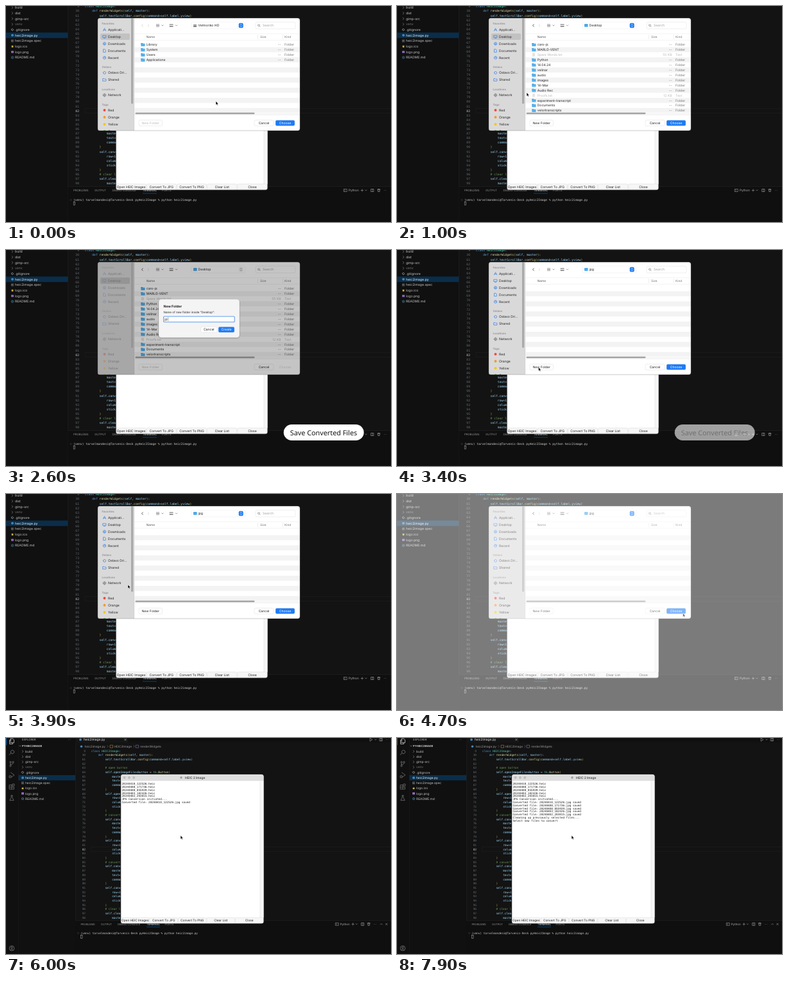
Recreate the animation shown at these times as an HTML page. Size 600 by 338 pixels, loop 8000 ms.

```html
<!DOCTYPE html>
<html lang="en">
<head>
<meta charset="utf-8">
<title>Saving converted files</title>
<style>
  html, body { margin: 0; width: 100%; height: 100%; overflow: hidden; background: #111; }
  svg { display: block; width: 100vw; height: 100vh; text-rendering: geometricPrecision; }
  text { font-family: Inter, "Liberation Sans", sans-serif; white-space: pre; }
  .mono { font-family: "DejaVu Sans Mono", monospace; }
  .note { font-family: "Noto Sans", "Open Sans", sans-serif; }
</style>
</head>
<body>
<svg id="stage" viewBox="0 0 600 338"></svg>
<script>
const LOOP = 8000, STEP = 100;
const BLUE = '#1d7bf5', ICON = '#2f80e4';

// y is the vertical middle of the line
const text = (x, y, str, size, fill, more = '') =>
  `<text x="${x}" y="${y + size * .36}" font-size="${size}" fill="${fill}" ${more}>${str}</text>`;
const mono = (x, y, str, size, fill, more = '') => text(x, y, str, size, fill, 'class="mono" ' + more);
const rect = (x, y, w, h, fill, r = 0, more = '') =>
  `<rect x="${x}" y="${y}" width="${w}" height="${h}" rx="${r}" fill="${fill}" ${more}/>`;
const dot = (x, y, r, fill, more = '') => `<circle cx="${x}" cy="${y}" r="${r}" fill="${fill}" ${more}/>`;
const line = (x, y, d, stroke, w = .6) =>
  `<path transform="translate(${x} ${y})" d="${d}" fill="none" stroke="${stroke}" stroke-width="${w}" stroke-linecap="round" stroke-linejoin="round"/>`;
const group = (id, body) => `<g id="${id}">${body}</g>`;
const MID = 'text-anchor="middle"', END = 'text-anchor="end"', BOLD = 'font-weight="600"';
const RIGHT = 'M-.9-1.7L.9 0L-.9 1.7', LEFT = 'M.9-1.7L-.9 0L.9 1.7', DOWN = 'M-1.2-.6L0 .6L1.2-.6';
const BOX = 'M-2-2H2V2H-2Z';

/* ---------- editor ---------- */
function paint(code) {
  const tones = ['#6a9955', '#569cd6', '#4ec9b0', '#dcdcaa', '#d7ba4a', '#9cdcfe'];
  return code.replace(/(#.*)|\b(class|def)\b|\b(HEIC2Image|tk)\b|\b(renderWidgets|config|Button|grid)\b|([()])|(\w+)/g,
    (m, ...g) => `<tspan fill="${tones[g.findIndex((v, i) => i < 6 && v)]}">${m}</tspan>`);
}

function codeLine(n) {
  if (n === 61) return [8, 'self.textScrollBar.config(command=self.label.yview)'];
  if (n < 63) return [0, ''];
  const k = n - 63;
  const [note, name] = [['open button', 'openImageFilesButton'], ['convert to jpg', 'convertToJPGButton'],
    ['convert to png', 'convertToPNGButton'], ['clear list', 'clearListButton']][Math.floor(k / 11)];
  return [[8, '# ' + note], [8, `self.${name} = tk.Button(`], [12, 'master,'], [12, 'text=label,'],
    [12, 'command=action'], [8, ')'], [8, `self.${name}.grid(`], [12, 'row=1,'], [12, 'column=0,'],
    [12, 'sticky=W'], [8, ')']][k % 11];
}

function tree(o) {
  const names = ['build', 'dist', 'gimp-src', 'venv', '.gitignore', 'heic2image.py', 'heic2image.spec',
    'logo.ico', 'logo.png', 'README.md'];
  const icon = [
    (x, y) => line(x, y, 'M0-1.7L1.7 0L0 1.7L-1.7 0Z', '#8a8f94', 1),
    (x, y) => dot(x, y, 2, '#4385b8'),
    (x, y) => line(x, y, 'M-1.7-1.4H1.7M-1.7 0H1.2M-1.7 1.4H1.7', '#a8a8a8', .6),
    (x, y) => `<path transform="translate(${x} ${y})" d="M0-2.2L.6-.7L2.2-.6L1 .5L1.4 2.1L0 1.2L-1.4 2.1L-1 .5L-2.2-.6L-.6-.7Z" fill="#d8c04a"/>`,
    (x, y) => rect(x - 2, y - 1.7, 4, 3.4, '#9068b8', .5),
    (x, y) => dot(x, y, 1.7, 'none', 'stroke="#519aba" stroke-width=".6"') + rect(x - .3, y - .8, .6, 1.7, '#519aba')
  ];
  return names.map((name, i) => {
    const y = o.treeY + i * 22 * o.s, x = o.treeX;
    return (i === 5 ? rect(o.left, y - 11 * o.s, o.edge - o.left, 22 * o.s, '#0a2e4a') : '') +
      (i < 4 ? line(x - 4, y, RIGHT, '#aaa', .5) : icon[i - 4](x - 4, y)) +
      text(x, y, name, 13 * o.s, i === 3 ? '#747474' : i === 5 ? '#f2f2f2' : '#c6c6c6');
  }).join('');
}

function panel(o) {
  const k = o.s / .394, y = o.tabY, c = '#b5b5b5', size = 11 * o.s;
  const tabs = ['PROBLEMS', 'OUTPUT', 'DEBUG CONSOLE', 'TERMINAL', 'PORTS'], at = [0, 33, 60.5, 108, 138];
  const p = dx => o.toolX + dx * k;
  return rect(o.edge, o.panelY, 600 - o.edge, 338, '#0f0f0f') + rect(o.edge, o.panelY, 600 - o.edge, .5, '#262626') +
    tabs.map((t, i) => text(o.panelX + at[i] * k, y, t, size, i === 3 ? '#e4e4e4' : '#8f8f8f')).join('') +
    rect(o.panelX + 108 * k, y + 4.3, 22 * k, .5, '#0078d4') +
    line(p(0), y, 'M-2.3-2H2.3V2H-2.3ZM-1.2-.8L-.2 0L-1.2 .8', c, .5) + text(p(5), y, 'Python', 12 * o.s, c) +
    line(p(26), y, 'M-1.8 0H1.8M0-1.8V1.8', c, .5) + line(p(32), y, DOWN, c, .5) +
    line(p(42), y, BOX + 'M0-2V2', c, .5) + line(p(52), y, 'M-2-1.4H2M-.7-2H.7M-1.4-1.4L-1.2 2H1.2L1.4-1.4', c, .6) +
    text(p(62), y - 1, '…', 5, c, MID) +
    dot(o.panelX - 4, o.promptY, 1.1, 'none', 'stroke="#555" stroke-width=".4"') +
    mono(o.panelX, o.promptY, '(venv) tarvelmondesi@Tarvenis-Desk pyHeic2Image % python heic2image.py', 11.62 * o.s, '#cfcfcf') +
    rect(o.panelX + .2, o.promptY + 3.2, 2.3, 4.8, 'none', 0, 'stroke="#bbb" stroke-width=".5"');
}

function editor(o) {
  const size = 11.9 * o.s, adv = size * .602, rowY = n => o.y82 + (n - 82) * o.pitch;
  const row = (y, n, indent, src) =>
    mono(o.codeX - 9, y, n, size, n === 82 ? '#d0d0d0' : '#666c72', END) +
    mono(o.codeX + indent * adv, y, paint(src), size, '#ccc');
  let out = rect(0, 0, 600, 338, '#131313') + rect(0, 0, o.edge, 338, '#101010') + rect(o.edge, 0, .5, 338, '#252525');
  out += rect(o.codeX, rowY(82) - o.pitch / 2, 600, o.pitch, 'none', 0, 'stroke="#232323" stroke-width=".5"');
  out += row(rowY(59), 9, 0, 'class HEIC2Image:') + row(rowY(60), 30, 4, 'def renderWidgets(self, master):');
  for (let n = 61; n < 99; n++) out += row(rowY(n), n, ...codeLine(n));
  return out + tree(o) + panel(o);
}

function appWindow(x, y, w, h, s) {
  const labels = ['Open HEIC Images', 'Convert To JPG', 'Convert To PNG', 'Clear List', 'Close'];
  const bw = w / 5, by = y + h - 9.3;
  return rect(x, y, w, h, '#fff', 3.5, 'stroke="#555" stroke-width=".5"') +
    `<path d="M${x} ${y + 10}v-6.5q0-3.5 3.5-3.5h${w - 7}q3.5 0 3.5 3.5v6.5z" fill="#dedede"/>` +
    [0, 1, 2].map(i => dot(x + 5.6 + i * 7.3, y + 5, 2, '#bdbdbd')).join('') +
    dot(x + 94, y + 5, 1.7, '#9a9a9a') + text(x + 100, y + 5, 'HEIC 2 Image', 13 * s, '#444', BOLD) +
    rect(x + w - 5.7, y + 10, 5.7, h - 19, '#f6f6f6') + rect(x + w - 5.7, y + 10, .4, h - 19, '#d5d5d5') +
    labels.map((t, i) => rect(x + i * bw + .5, by, bw - 1, 8.6, '#f6f6f6', 1.6, 'stroke="#cfcfcf" stroke-width=".4"') +
      text(x + (i + .5) * bw, by + 4.5, t, 12.8 * s, '#1c1c1c', MID)).join('');
}

/* ---------- folder chooser ---------- */
const button = (x, y, w, h, label, fill, ink) =>
  rect(x, y, w, h, fill, 2, 'stroke="#d4d4d4" stroke-width=".4"') + text(x + w / 2, y + h / 2, label, 5.1, ink, MID);

function places(selected, dim) {
  const head = [[27, 'Favorites'], [95.5, 'Ostavo'], [130, 'Locations'], [154, 'Tags']];
  const items = [
    [37, 'Applicati...', 'M-2 2L0-2.2L2 2M-1.5 .6H1.5'],
    [48, 'Desktop', 'M-2.4-1.8H2.4V1.3H-2.4ZM-1 2.3H1'],
    [59, 'Downloads', 'M-2.2 0A2.2 2.2 0 1 1 2.2 0A2.2 2.2 0 1 1-2.2 0M0-1.1V1M-.8 .3L0 1.1L.8 .3'],
    [70, 'Documents', 'M-1.6-2.3H.6L1.7-1V2.3H-1.6Z'],
    [81, 'Recent', 'M-2.2 0A2.2 2.2 0 1 1 2.2 0A2.2 2.2 0 1 1-2.2 0M0-1.3V0H1'],
    [104.5, 'Ostavo Dri...', 'M-2 0A2 2 0 1 1 2 0A2 2 0 1 1-2 0'],
    [115.5, 'Shared', 'M-2.4-1.8H-.5L0-1.2H2.4V1.9H-2.4Z'],
    [139.5, 'Network', 'M-2.2 0A2.2 2.2 0 1 1 2.2 0A2.2 2.2 0 1 1-2.2 0M-2.2 0H2.2M0-2.2V2.2']
  ];
  const tags = [[163, 'Red', '#f0483e'], [174, 'Orange', '#f59a23'], [185, 'Yellow', '#f3c613'], [196, 'Green', '#57c038']];
  return (selected ? rect(147, 43, 46, 10, '#c3c2c3', 1.8) : '') +
    `<g opacity="${dim ? .35 : 1}">` +
    head.map(([y, t]) => text(149.5, y, t, 4.3, '#8f8d8f', BOLD)).join('') +
    items.map(([y, t, d]) => line(153.5, y, d, t === 'Network' ? '#777' : ICON, .7) + text(159, y, t, 5.1, '#262626')).join('') +
    tags.map(([y, t, c]) => dot(153.5, y, 2, c) + text(159, y, t, 5.1, '#262626')).join('') + '</g>';
}

function listing(rows) {
  return rows.map(([name, size], i) => {
    const y = 60.5 + i * 7.93, ink = size ? '#b5b5b5' : '#222', soft = size ? '#bbb' : '#777';
    const icon = size ? rect(211, y - 2.5, 4, 5, '#e4e4e4', .4) :
      rect(210.3, y - 2.4, 3, 2, '#3c9be0', .5) + rect(210.3, y - 1.8, 6.2, 4.4, '#56b0ec', .6);
    return icon + text(218.7, y, name, 5.1, ink) + text(428.5, y, size || '--', 5.1, soft, END) +
      text(434, y, size ? 'Text' : 'Folder', 5.1, soft);
  }).join('');
}

function chooser(id, place, rows, o = {}) {
  const ink = '#555', pale = '#cfcfcf';
  let out = '<g clip-path="url(#frame)">' + rect(143, 19, 315, 176, '#fff') + rect(143, 19, 57, 176, '#dad9da') +
    rect(199.7, 19, .4, 176, '#c8c8c8') + places(o.selected, o.dim) + rect(195, 19, 3.2, 134, o.dim ? '#c2c2c2' : '#a9a9a9', 1.5);
  for (let i = 1; i < 14; i += 2) out += rect(200, 56.5 + i * 7.93, 258, 7.93, '#f3f3f3');
  out += listing(rows) + rect(200, 43, 258, .4, '#e4e4e4') + rect(200, 53.4, 258, .4, '#e0e0e0') +
    [392, 431].map(x => rect(x, 45, .4, 7, '#d5d5d5')).join('') +
    text(218.7, 48.6, 'Name', 4.8, '#555') + text(396, 48.6, 'Size', 4.8, '#777') + text(434, 48.6, 'Kind', 4.8, '#777') +
    rect(200, 166, 258, 4.2, '#f7f7f7') + rect(201.5, 166.7, 186, 2.6, '#a2a2a2', 1.3) + rect(200, 170.3, 258, .4, '#dedede');
  // toolbar
  out += line(212.3, 30.5, LEFT, o.back ? '#333' : pale, .8) + line(222, 30.5, RIGHT, pale, .7) +
    line(236.5, 30.5, 'M-2.2-1.6H2.2M-2.2 0H2.2M-2.2 1.6H2.2', ink, .6) + line(244, 30.5, DOWN, ink, .6) +
    line(257.5, 30.5, 'M-2.4-1.5H-.9M-.1-1.5H1M1.8-1.5H2.6M-2.4 1.3H-.9M-.1 1.3H1M1.8 1.3H2.6', ink, 1.2) + line(265.5, 30.5, DOWN, ink, .6) +
    rect(289, 25.2, 84, 10.6, '#fff', 2, 'stroke="#e6e6e6" stroke-width=".4"') +
    (o.disk ? rect(292, 28.4, 5, 4.4, '#a9a9a9', .7) + rect(292, 31.3, 5, 1.5, '#777', .5) : rect(292, 28, 5.6, 4.8, '#4da9e8', .7)) +
    text(299.5, 30.6, place, 5.1, '#222') + rect(362.7, 26.8, 7, 7.4, o.dim ? '#f2f2f2' : BLUE, 1.7) +
    line(366.2, 30.5, 'M-1.2-.9L0-2.1L1.2-.9M-1.2 .9L0 2.1L1.2 .9', o.dim ? '#777' : '#fff', .7) +
    rect(389, 25.2, 62, 10.6, '#fff', 2, 'stroke="#dedede" stroke-width=".5"') +
    line(394, 30.2, 'M-1.5 0A1.5 1.5 0 1 1 1.5 0A1.5 1.5 0 1 1-1.5 0M1.1 1.1L2.2 2.2', '#777', .6) + text(400, 30.6, 'Search', 5.1, '#a0a0a0');
  // footer
  out += button(207, 178.5, 36.5, 9.2, 'New Folder', '#fff', o.dim || o.disk ? '#bdbdbd' : '#222') +
    button(387, 178.5, 30, 9.2, 'Cancel', '#fff', '#222') +
    (o.dim ? text(435, 183.1, 'Choose', 5.1, '#d2d2d2', MID) : button(420, 178.7, 30, 8.8, 'Choose', BLUE, '#fff'));
  if (o.dim) out += rect(143, 19, 315, 176, '#000', 0, 'opacity=".23"');
  return group(id, out + '</g>' + rect(143, 19, 315, 176, 'none', 3.5, 'stroke="#777" stroke-width=".4"'));
}

function sheet() {
  return group('sheet',
    rect(237, 77, 128, 62, '#000', 5, 'opacity=".1"') +
    rect(238, 77, 126, 60, '#f4f4f4', 4, 'stroke="#999" stroke-width=".3"') +
    text(245.5, 88.2, 'New Folder', 5.2, '#1c1c1c', 'font-weight="700"') +
    text(245.5, 97.8, 'Name of new folder inside “Desktop”:', 4.5, '#222') +
    rect(245.6, 104, 110.6, 8.8, '#fff', 1, 'stroke="#5f9df0" stroke-width="1.1"') +
    `<rect id="pick" x="247" y="105.2" width="34.5" height="6.5" fill="#b0d4fb"/>` +
    text(247.3, 108.5, '', 5.1, '#222', 'id="field"') +
    button(303.5, 120.2, 25.5, 8.8, 'Cancel', '#fff', '#222') + button(331, 120.2, 25, 8.8, 'Create', BLUE, '#fff'));
}

/* ---------- scenes ---------- */
const rootRows = ['Library', 'System', 'Users', 'Applications'].map(n => [n]);
const deskRows = [['caro-js'], ['MARLO-VENT'], ['Spare Words.txt', '55 KB'], ['Python'], ['14.04.24'], ['velinar'], ['audio'],
  ['images'], ['14-Mar'], ['Audio Rec'], ['Proofs.txt', '12 KB'], ['experiment-transcript'], ['Documents'], ['velortranscripts']];

const first = editor({ s: .394, left: 0, edge: 96.5, treeX: 14, treeY: 2.5, codeX: 123, y82: 164, pitch: 7.1,
    panelY: 282, panelX: 105, tabY: 288.5, toolX: 529, promptY: 303.5 }) +
  appWindow(171.5, 43, 236, 244.8, .394) +
  chooser('root', 'Velmoriko HD', rootRows, { disk: true, selected: true }) +
  chooser('desk', 'Desktop', deskRows, { back: true, selected: true }) +
  chooser('deskDim', 'Desktop', deskRows, { back: true, selected: true, dim: true }) +
  chooser('empty', 'jpg', [], { back: true }) + sheet() +
  group('pill', rect(432.7, 273, 125, 25, '#fff', 12.5)) +
  text(495, 285.8, 'Save Converted Files', 10.8, '#151515', 'id="note" class="note" ' + MID);

const stamps = ['20240410_122526', '20240488_171736', '20240408_055939', '20240403_182426', '20240402_203815'];
const log = [...stamps.map(s => s + '.heic'), 'JPG Conversion initiated...',
  ...stamps.map(s => `Converted file: ${s}.jpg saved`), 'Cleaning up previously selected files...', 'Select new files to convert'];

function activityBar() {
  const c = '#7d7d7d';
  return rect(0, 0, 19, 338, '#101010') + rect(19, 0, .4, 338, '#222') + rect(0, 0, .7, 11, '#0078d4') +
    line(9, 5, 'M-1.5-4H1.5L3.5-2V2.4H-1.5ZM-1.5-1.8H-3.5V4.4H1.5V2.4', '#dcdcdc', .7) +
    line(9, 22.5, 'M-1.2 .8A2.7 2.7 0 1 1 2.7 1.4A2.7 2.7 0 0 1-1.2 .8L-3.8 3.8', c, .8) +
    line(9, 40.5, 'M-2-1.2V1.8M2-1.2Q2 1-2 1.2', c, .7) +
    [[7, 37.8], [7, 43.6], [11, 37.8]].map(([x, y]) => dot(x, y, 1.2, '#101010', `stroke="${c}" stroke-width=".7"`)).join('') +
    line(9, 58, 'M-1.5-4L4 0L-.5 3M-3.5 1H-1V4H-3.5Z', c, .7) +
    line(9, 76, 'M-3.5-2.5H0V4H-3.5ZM-3.5 .8H3.5V4H0M1.2-4H4V-1.2H1.2Z', c, .7) +
    line(9, 94, 'M-1-4H1M-.8-4V-1L-3.2 3.6H3.2L.8-1V-4', c, .7) +
    dot(9, 329, 3.9, 'none', `stroke="${c}" stroke-width=".7"`) + dot(9, 328, 1.4, 'none', `stroke="${c}" stroke-width=".7"`) +
    line(9, 331, 'M-2.4 .6Q0-2 2.4 .6', c, .7);
}

const second = editor({ s: .374, left: 19, edge: 108, treeX: 30, treeY: 21, codeX: 133, y82: 174, pitch: 6.7,
    panelY: 285, panelX: 116.5, tabY: 291.3, toolX: 516, promptY: 305.3 }) +
  activityBar() +
  text(25, 2.7, 'EXPLORER', 4.2, '#b5b5b5') + text(99, 1.5, '…', 5, '#b5b5b5', MID) +
  line(22, 12.5, DOWN, '#bbb', .5) + text(25, 12.5, 'PYHEIC2IMAGE', 4.1, '#d0d0d0', 'font-weight="700"') +
  rect(108.4, 0, 492, 7, '#101010') + rect(108.4, 0, 82, 7.5, '#161616') +
  dot(116, 2.6, 1.9, '#4385b8') + text(121, 2.6, 'heic2image.py', 4.8, '#eee') + line(186, 2.6, 'M-1.3-1.3L1.3 1.3M1.3-1.3L-1.3 1.3', '#ccc', .5) +
  dot(117.5, 13.2, 1.8, '#4385b8') + text(122.5, 13.2, 'heic2image.py', 4.7, '#9a9a9a') + line(158.5, 13.2, RIGHT, '#888', .4) +
  line(164.5, 13.2, BOX, '#d99a3a', .5) + text(168.5, 13.2, 'HEIC2Image', 4.7, '#9a9a9a') + line(199.5, 13.2, RIGHT, '#888', .4) +
  line(204.5, 13.2, BOX, '#a879cf', .5) + text(209, 13.2, 'renderWidgets', 4.7, '#9a9a9a') +
  line(569, 2.6, 'M-1.5-2.3L2 0L-1.5 2.3Z', '#bbb', .5) + line(576, 2.6, DOWN, '#bbb', .5) +
  line(584.5, 2.6, BOX + 'M0-2V2', '#bbb', .5) + text(594, 1.6, '…', 5, '#bbb', MID) +
  line(585, 291.3, 'M-1.5 .7L0-.8L1.5 .7', '#b5b5b5', .5) + line(593, 291.3, 'M-1.3-1.3L1.3 1.3M1.3-1.3L-1.3 1.3', '#b5b5b5', .5) +
  appWindow(179, 57, 222.5, 233.3, .374) +
  log.map((t, i) => mono(180.5, 71.6 + i * 4.8, t, 4.32, '#1a1a1a', 'data-log')).join('');

const stage = document.getElementById('stage');
stage.innerHTML = '<clipPath id="frame">' + rect(143, 19, 315, 176, '#fff', 3.5) + '</clipPath>' +
  group('first', first) + group('second', second) +
  '<path id="cursor" d="M0 0V5.8L1.35 4.6L2.2 6.6L3.2 6.2L2.35 4.2H4.1Z" fill="#000" stroke="#fff" stroke-width=".45"/>' +
  rect(0, 0, 600, 338, '#fff', 0, 'id="veil"');

/* ---------- timeline ---------- */
const el = id => document.getElementById(id);
const logLines = [...stage.querySelectorAll('[data-log]')];
const show = (node, on) => node.setAttribute('visibility', on ? 'visible' : 'hidden');
const smooth = u => u * u * (3 - 2 * u);

function track(keys, t, ease = u => u) {
  const i = keys.findIndex(k => k[0] > t);
  if (i === 0) return keys[0].slice(1);
  if (i < 0) return keys[keys.length - 1].slice(1);
  const a = keys[i - 1], b = keys[i], u = ease((t - a[0]) / (b[0] - a[0]));
  return a.slice(1).map((v, j) => v + (b[j + 1] - v) * u);
}
const latest = (steps, t) => steps.filter(s => s[0] <= t).pop()[1];

const path = [[0, 327, 149], [500, 168, 47], [700, 168, 47], [1200, 220.5, 183.5], [3400, 220.5, 183.5],
  [3900, 190, 142], [4500, 445.5, 186.5]];
const pillFade = [[1200, 0], [1500, .5], [1800, 1], [3200, 1], [3700, 0]];
const noteFade = [[1600, 0], [2100, 1], [3200, 1], [3500, 0]];
const veilFade = [[4500, 0], [4700, .44], [4900, .99], [5100, .99], [5200, .5], [5300, 0]];
const dialogs = [[0, 'root'], [600, 'desk'], [1300, 'deskDim'], [3300, 'empty']];
const typed = [[0, 'untitled folder'], [2300, '|'], [2400, 'j|'], [2500, 'jp|'], [2800, 'jpg|']];
const logged = [[0, 6], [5800, 7], [6200, 8], [6600, 9], [7000, 10], [7300, 11], [7400, 13]];

function draw(t) {
  const later = t >= 5000;
  el('first').style.display = later ? 'none' : '';
  el('second').style.display = later ? '' : 'none';
  const open = latest(dialogs, t);
  for (const [, id] of dialogs) el(id).style.display = id === open ? '' : 'none';
  el('sheet').style.display = open === 'deskDim' ? '' : 'none';
  el('field').textContent = latest(typed, t);
  show(el('pick'), t < 2300);
  el('pill').setAttribute('opacity', track(pillFade, t)[0]);
  el('note').setAttribute('opacity', track(noteFade, t)[0]);
  el('veil').setAttribute('opacity', track(veilFade, t)[0]);
  logLines.forEach((node, i) => { node.style.display = i < latest(logged, t) ? '' : 'none'; });
  const [x, y] = later ? [272, 152.5] : track(path, t, smooth);
  el('cursor').setAttribute('transform', `translate(${x} ${y})`);
  show(el('cursor'), t < 2300 || t >= 3400);
}

const start = performance.now();
function tick() {
  const t = (performance.now() - start) % LOOP;
  draw(Math.floor((t + 3) / STEP) * STEP % LOOP);
  requestAnimationFrame(tick);
}
tick();
</script>
</body>
</html>
```
